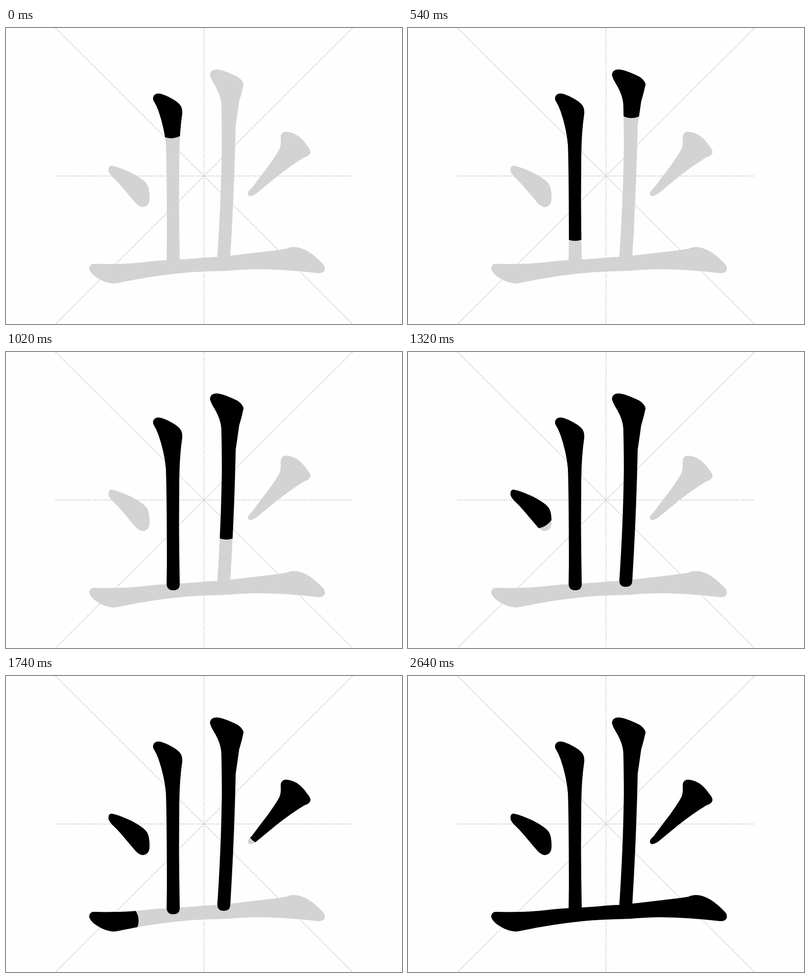
An HTML page that plays this animation: 800x600 px, repeating every 2700 ms.

```html
<!DOCTYPE html>
<html lang="zh">
<head>
<meta charset="utf-8">
<title>Stroke order</title>
<style>
  html, body { margin: 0; width: 100%; height: 100%; overflow: hidden; background: #fefefe; }
  svg { display: block; width: 100vw; height: 100vh; }
</style>
</head>
<body>
<svg id="stage" viewBox="0 0 800 600">
  <g stroke="#d3d3d3" stroke-width="1" stroke-dasharray="1 1" transform="translate(100 0) scale(2.34375)">
    <path d="M0 0L256 256"/>
    <path d="M256 0L0 256"/>
    <path d="M128 0V256"/>
    <path d="M0 128H256"/>
  </g>
  <g id="base" fill="#d3d3d3"></g>
  <g id="ink" fill="none" stroke="#000" stroke-width="75" stroke-linecap="round" stroke-linejoin="round"></g>
</svg>
<script>
const LOOP = 2700, STEP = 60;

// shape: outline; spine: brush path; start in ms; speed in px per ms
const strokes = [
  {
    shape: 'M297 143C297 136 303 132 310 133Q318 134 330 140.5Q345 148 351 155Q357 162 356 174' +
      'Q350 214 350 270L349.5 350Q350 420 351 470Q351 483 338 483Q325 483 324.5 470L325 430' +
      'Q325 290 323 236Q320 203 308 168Q304 157 299 149Q297 146 297 143Z',
    spine: 'M308 143L330 170L333.5 186L337.5 250V470',
    start: -133, speed: 0.3854
  },
  {
    shape: 'M412 95Q413 84 426 84Q440 85 468 99Q478 106 480 114Q476 133 471 149Q467 178 464 198' +
      'L463 240Q460 350 453 465Q452 476 440 476Q427 476 427 463Q435 340 436 240Q436 190 435 155' +
      'Q434 138 423 118Q413 102 412 95Z',
    spine: 'M424 94L446 122L451.5 145L449.5 240L445 342.5L440 463',
    start: 396, speed: 0.412
  },
  {
    shape: 'M207 288Q207 279 213 279Q223 280 250 292Q278 306 285 317Q290 325 290 345' +
      'Q290 362 276 363Q269 362 262 355L235 323Q224 310 214 301Q207 293 207 288Z',
    spine: 'M214 287L258.4 320L276 348',
    start: 1147, speed: 0.32
  },
  {
    shape: 'M555 225Q554 211 565 210Q590 211 608 238Q616 247 615 253Q613 259 603 262' +
      'Q575 279 545 303L510 332Q501 340 493 341Q488 340 489 334Q490 330 496 325L530 280' +
      'Q549 253 553 244Q556 235 555 225Z',
    spine: 'M565 220L578 246L549 277.6L522.7 305L497 334',
    start: 1393, speed: 0.3165
  },
  {
    shape: 'M168 487Q169 478 178 478L200 478.5Q250 478 275 475Q305 471 340 470L385 467' +
      'Q400 465 427 464L466 460L550 450L566 447.5Q573 444 582 444Q608 444 640 478' +
      'Q645 483 644 490Q642 497 632 497Q560 489 505 489Q470 490 450 492L405 493.5' +
      'Q330 496 235 515Q222 518 217 518Q198 517 178 502Q168 493 168 487Z',
    spine: 'M178 488L230.5 496L433.5 477L580 467L628 488',
    start: 1631, speed: 0.4855
  }
];

function add(parent, tag, attrs) {
  const el = document.createElementNS('http://www.w3.org/2000/svg', tag);
  for (const k in attrs) el.setAttribute(k, attrs[k]);
  return parent.appendChild(el);
}

const stage = document.getElementById('stage');
const base = document.getElementById('base');
const ink = document.getElementById('ink');

strokes.forEach((s, i) => {
  add(base, 'path', { d: s.shape });
  add(add(stage, 'clipPath', { id: 'clip' + i }), 'path', { d: s.shape });
  s.brush = add(ink, 'path', { d: s.spine, 'clip-path': `url(#clip${i})` });
  s.total = s.brush.getTotalLength();
});

function draw(ms) {
  const t = Math.floor((ms % LOOP + 0.01) / STEP) * STEP;
  for (const s of strokes) {
    const len = Math.min((t - s.start) * s.speed, s.total + 1);
    s.brush.setAttribute('visibility', len > 0 ? 'visible' : 'hidden');
    if (len > 0) s.brush.setAttribute('stroke-dasharray', `${len} 2000`);
  }
}

function tick(now) {
  draw(now);
  requestAnimationFrame(tick);
}
draw(0);
requestAnimationFrame(tick);
</script>
</body>
</html>
```
